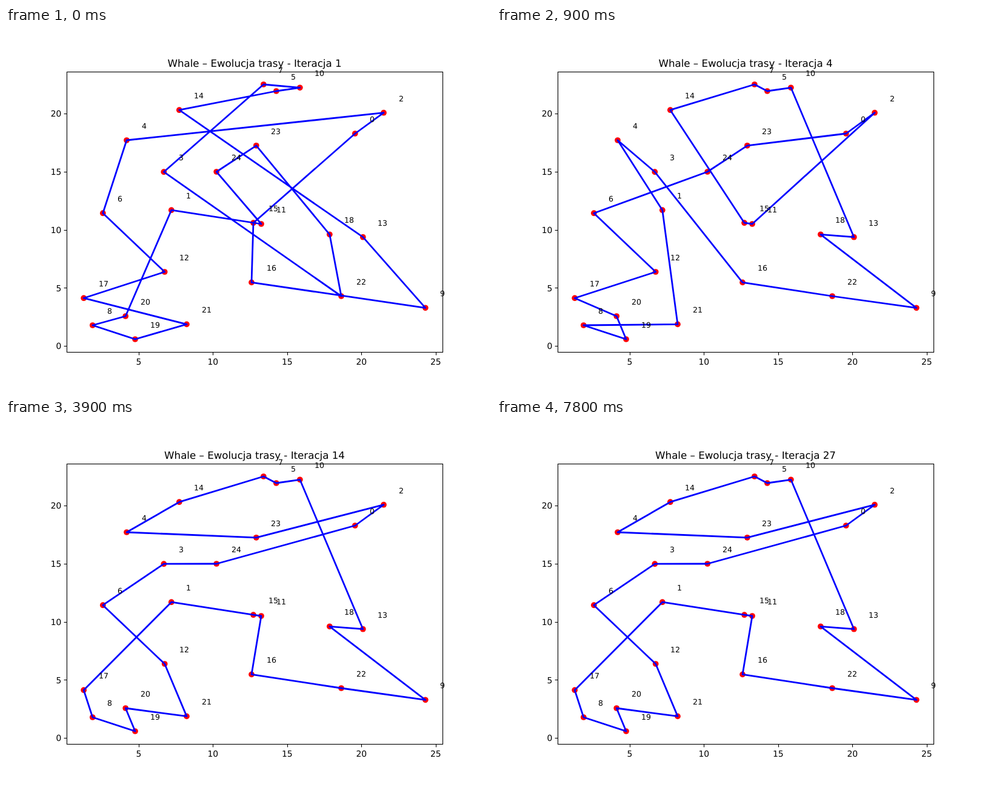
These frames come from a looping animation (800 px wide and 600 px high, 8 s). An HTML page:

```html
<!DOCTYPE html>
<html lang="pl">
<head>
<meta charset="utf-8">
<title>Ewolucja trasy</title>
<style>
  html, body { margin: 0; width: 100%; height: 100%; overflow: hidden; background: #fff; }
  svg { display: block; width: 800px; height: 600px; }
  text { font-family: "DejaVu Sans", Verdana, sans-serif; fill: #000; text-rendering: geometricPrecision; }
  .title { font-size: 16.667px; text-anchor: middle; }
  .tick { font-size: 13.889px; }
  .label { font-size: 12.5px; }
  .axis { fill: none; stroke: #000; stroke-width: 1.11; }
  .route { fill: none; stroke: #00f; stroke-width: 2.78; stroke-linejoin: round; }
  .city { fill: #f00; }
</style>
</head>
<body>
<svg id="stage" viewBox="0 0 800 600"></svg>
<script>
const STEP = 300, LOOP = 8000;
const UNIT_X = 24.5, UNIT_Y = 19.16;   // pixels per data unit

// the key points: cities in pixels, indexed by city number
const cities = [
  [575.8, 174], [272.8, 300.2], [623, 139.7], [260.3, 237.2], [199, 185],
  [445.8, 104], [159.8, 305.2], [424.8, 93], [142.8, 490], [691.8, 461.3],
  [484.8, 98.3], [421, 323], [261.7, 402], [588.8, 344.7], [285.8, 135.2],
  [408, 321.2], [405, 419.4], [128.2, 445.2], [533.8, 340.3], [213, 513],
  [197.2, 475], [298, 488.4], [553, 442], [412.8, 193.8], [347.2, 237]
];

// the tour evolves: later stages keep the rim and swap cities
const rim = [14, 7, 5, 10, 13, 18, 9, 22, 16];
const first = [4, 2, 0, 15, 16, 9, 13, 14, 5, 10, 7, 3, 22, 18, 23, 24, 11, 1, 20, 8, 19, 21, 17, 12, 6];
const second = [4, 3, ...[...rim].reverse(), 15, 11, 2, 0, 23, 24, 6, 12, 17, 20, 19, 8, 21, 1];
const third = [4, ...rim, 11, 15, 1, 17, 8, 19, 20, 21, 12, 6, 3, 23, 0, 2, 24];
const last = swap(third, 23, 24);

function swap(tour, a, b) {
  return tour.map(c => c === a ? b : c === b ? a : c);
}

function tourAt(iteration) {
  if (iteration < 2) return first;
  if (iteration < 5) return second;
  return iteration < 8 ? third : last;
}

const stage = document.getElementById("stage");

function add(tag, attrs, content = "") {
  const el = document.createElementNS("http://www.w3.org/2000/svg", tag);
  for (const key in attrs) el.setAttribute(key, attrs[key]);
  el.textContent = content;
  return stage.appendChild(el);
}

const snap = v => Math.round(v) + 0.5;

add("rect", { width: 800, height: 600, fill: "#fff" });
for (const [cx, cy] of cities) add("circle", { class: "city", cx, cy, r: 4.86 });
const route = add("path", { class: "route" });

add("rect", { class: "axis", x: 100.5, y: 72.5, width: 620, height: 462 });
for (let v = 5; v <= 25; v += 5) {
  const x = 96.35 + UNIT_X * v;
  add("path", { class: "axis", d: `M${snap(x)} 534.5v4.86` });
  add("text", { class: "tick", x, y: 555, "text-anchor": "middle" }, v);
}
for (let v = 0; v <= 20; v += 5) {
  const y = 524.2 - UNIT_Y * v;
  add("path", { class: "axis", d: `M100.5 ${snap(y)}h-4.86` });
  add("text", { class: "tick", x: 91.3, y: Math.round(y + 5.2), "text-anchor": "end" }, v);
}

cities.forEach(([x, y], i) =>
  add("text", { class: "label", x: Math.round(x + UNIT_X), y: Math.round(y - UNIT_Y) }, i));
const title = add("text", { class: "title", x: 410, y: 64 });

let shown = 0;

function draw(now) {
  const iteration = Math.floor((now % LOOP) / STEP) + 1;
  if (iteration === shown) return;
  shown = iteration;
  const points = tourAt(iteration).map(i => cities[i].join(" "));
  route.setAttribute("d", `M${points.join("L")}Z`);
  title.textContent = `Whale – Ewolucja trasy - Iteracja ${iteration}`;
}

const start = performance.now();
function tick() {
  draw(performance.now() - start);
  requestAnimationFrame(tick);
}
tick();
</script>
</body>
</html>
```
